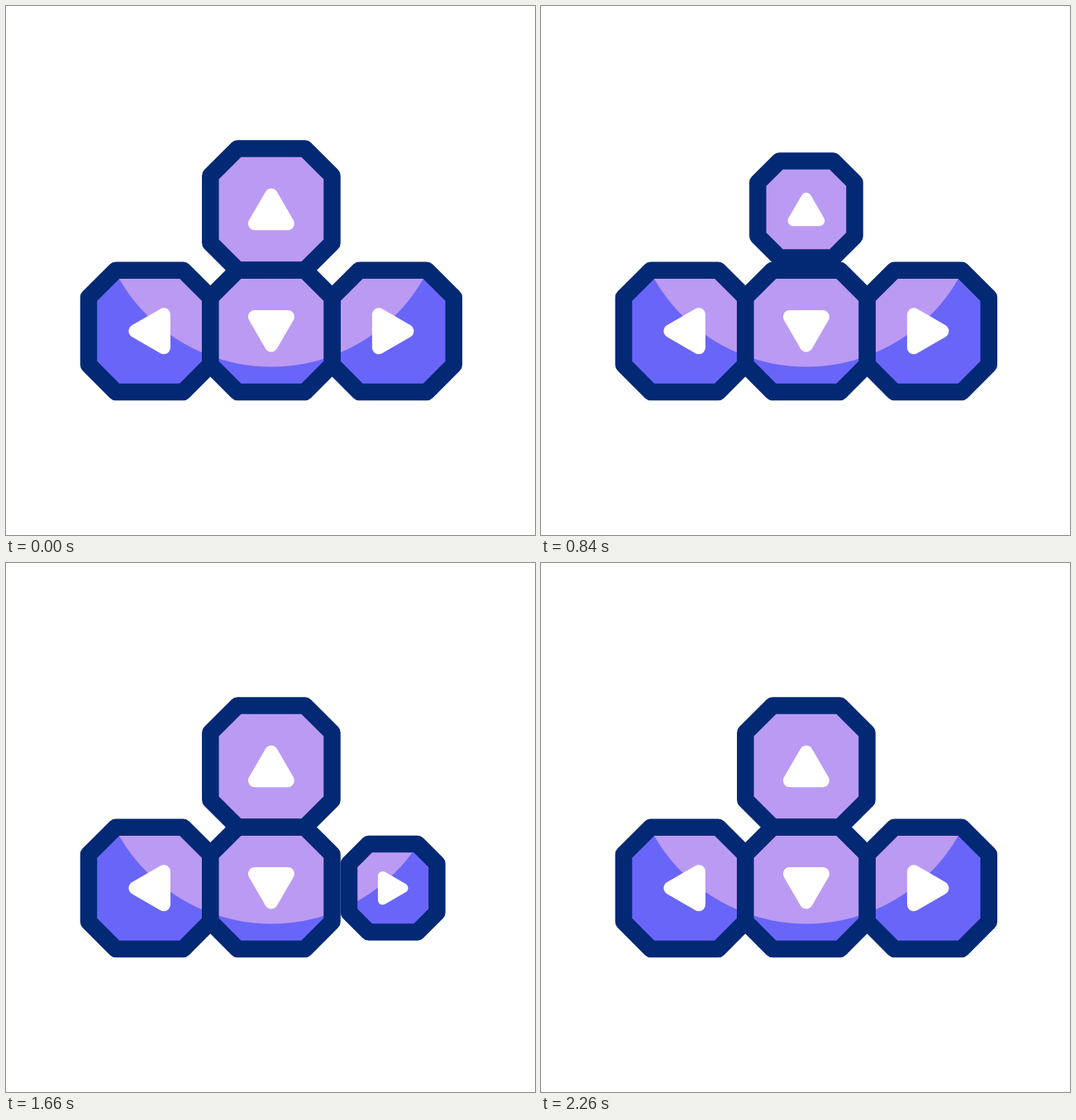
These frames come from a looping animation (640x640 px, 2.4 s). An HTML page with a canvas:

```html
<!DOCTYPE html>
<html lang="en">
<head>
<meta charset="utf-8">
<title>Arrow keys</title>
<style>
  html, body { margin: 0; width: 100%; height: 100%; overflow: hidden; background: #fff; }
  canvas { display: block; width: 640px; height: 640px; }
</style>
</head>
<body>
<canvas id="stage" width="640" height="640"></canvas>
<script>
const ctx = document.getElementById('stage').getContext('2d');

const LOOP = 2400;
const TAP = 320;
const DEPTH = 0.4;
const NAVY = '#032975', BLUE = '#6965f9', LILAC = '#bb9af3';
const HALF = 73.6, FLAT = 40.75, OUTLINE = 20.5;
const GLOW = { x: 320.9, y: 224.3, r: 212.2 };

// Each key has a centre, an arrow direction in quarter turns and its tap start times.
const keys = [
  { x: 173.6, y: 393.3, turn: 3, taps: [0, 1280] },
  { x: 320.9, y: 246,   turn: 0, taps: [260, 760, 1780] },
  { x: 468.2, y: 393.3, turn: 1, taps: [520, 1560] },
  { x: 320.9, y: 393.3, turn: 2, taps: [1020, 1940] }
];

const smooth = u => u * u * (3 - 2 * u);

function scaleAt(taps, time) {
  const start = taps.find(t => time >= t && time < t + TAP);
  if (start === undefined) return 1;
  const phase = (time - start) / TAP;
  return 1 - DEPTH * smooth(1 - Math.abs(2 * phase - 1));
}

function octagon(x, y, scale) {
  const h = HALF * scale, f = FLAT * scale;
  const path = new Path2D();
  [[-f, -h], [f, -h], [h, -f], [h, f], [f, h], [-f, h], [-h, f], [-h, -f]]
    .forEach(([dx, dy]) => path.lineTo(x + dx, y + dy));
  path.closePath();
  return path;
}

function drawArrow(key, scale) {
  ctx.save();
  ctx.translate(key.x, key.y);
  ctx.rotate(key.turn * Math.PI / 2);
  ctx.scale(scale, scale);
  ctx.beginPath();
  ctx.moveTo(0, -17.3);
  ctx.lineTo(20, 17.3);
  ctx.lineTo(-20, 17.3);
  ctx.closePath();
  ctx.fillStyle = ctx.strokeStyle = '#fff';
  ctx.lineWidth = 16;
  ctx.fill();
  ctx.stroke();
  ctx.restore();
}

function drawKey(key, time) {
  const scale = scaleAt(key.taps, time);
  const shape = octagon(key.x, key.y, scale);

  ctx.save();
  ctx.clip(shape);
  ctx.fillStyle = BLUE;
  ctx.fill(shape);
  ctx.beginPath();
  ctx.arc(GLOW.x, GLOW.y, GLOW.r, 0, 2 * Math.PI);
  ctx.fillStyle = LILAC;
  ctx.fill();
  ctx.restore();

  ctx.strokeStyle = NAVY;
  ctx.lineWidth = OUTLINE;
  ctx.stroke(shape);
  drawArrow(key, scale);
}

function render() {
  const time = performance.now() % LOOP;
  ctx.fillStyle = '#fff';
  ctx.fillRect(0, 0, 640, 640);
  ctx.lineJoin = 'round';
  keys.forEach(key => drawKey(key, time));
  requestAnimationFrame(render);
}

render();
</script>
</body>
</html>
```
